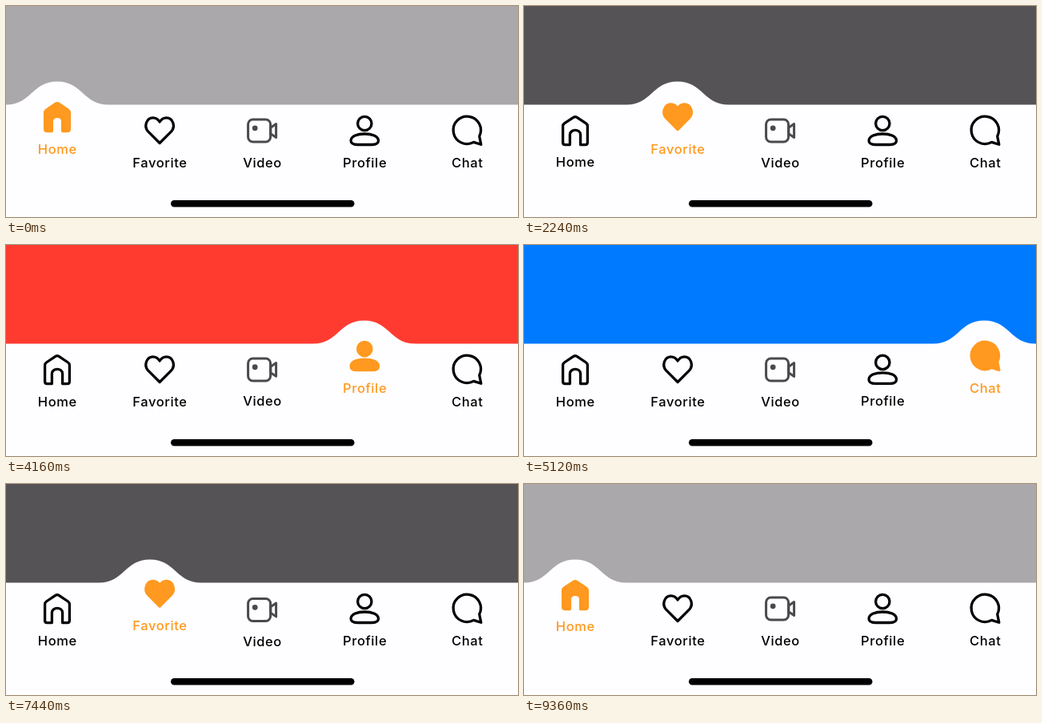
An HTML page for the animation above (9.92 s loop, 640 px wide and 264 px high).

```html
<!DOCTYPE html>
<html lang="en">
<head>
<meta charset="utf-8">
<title>Tab bar</title>
<style>
  html, body { margin: 0; width: 100%; height: 100%; overflow: hidden; background: #fefdff; }
  svg { display: block; width: 100%; height: 100%; }
  text {
    font: 500 16.5px Inter, "Liberation Sans", sans-serif;
    letter-spacing: .6px; text-anchor: middle; fill: #000;
  }
  .icon { fill: none; stroke: #000; stroke-width: 3.3; stroke-linejoin: round; stroke-linecap: round; }
  .video { stroke: #4a494b; stroke-width: 3; }
  .dot { fill: #4a494b; stroke: none; }
  .on text, .on .dot { fill: #ff991f; }
  .on .icon { fill: #ff991f; stroke: #ff991f; }
  .on .video { stroke-width: .4; }
</style>
</head>
<body>
<svg viewBox="0 0 640 264">
  <rect id="page" width="640" height="130"/>
  <path id="bar" fill="#fefdff"/>
  <g id="tabs"></g>
  <rect x="206" y="243" width="229.5" height="8.6" rx="4.3"/>
</svg>
<script>
// Icons are drawn around x = 0, at their resting height.
const TABS = [
  { label: 'Home', page: '#aaa8aa', icon: `<path class="icon" d="M-6.6 173.6H-12.5Q-15.4 173.6 -15.4 170.7V150.5
      Q-15.4 148.2 -13.6 147L-2.2 139.3Q0 137.9 2.2 139.3L13.6 147Q15.4 148.2 15.4 150.5V170.7
      Q15.4 173.6 12.5 173.6H6.6V161C6.6 153.6 -6.6 153.6 -6.6 161Z"/>` },
  { label: 'Favorite', page: '#555355', icon: `<path class="icon" d="M0 171.5L-14.6 156.8C-20.2 150.6 -16.4 139.8 -8.4 139.8
      C-4.6 139.8 -1.8 142 0 145C1.8 142 4.6 139.8 8.4 139.8C16.4 139.8 20.2 150.6 14.6 156.8Z"/>` },
  { label: 'Video', page: '#00fc00', icon: `<g class="icon video"><rect x="-17.6" y="142" width="28" height="28" rx="6"/>
      <path d="M10.6 152.2L17.4 147.6V164.4L10.6 159.8Z"/></g><circle class="dot" cx="-9" cy="152.8" r="3.4"/>` },
  { label: 'Profile', page: '#ff3b30', icon: `<g class="icon"><circle cy="147" r="8.7"/>
      <path d="M-17.2 168.6C-17.2 162.4 -8.5 160 0 160S17.2 162.4 17.2 168.6C17.2 172.2 13 173.5 9 173.5H-9
      C-13 173.5 -17.2 172.2 -17.2 168.6Z"/></g>` },
  { label: 'Chat', page: '#007aff', icon: `<path class="icon" d="M15.3 163L17.4 173.3L8.2 170.4A17.2 17.2 0 1 1 15.3 163Z"/>` }
];
const TAPS = [
  [0, 0], [1340, 1], [2370, 2], [3330, 3], [4370, 4], [5150, 3], [6320, 2], [7060, 1], [8210, 0]
];
const LOOP = 9920, STEP = 80, LIFT = 17, HUMP_DELAY = 40;
const DAMPING = .6, OMEGA = 11.5;

const page = document.getElementById('page');
const bar = document.getElementById('bar');
const tabs = document.getElementById('tabs');
const centre = i => 64 + 128.1 * i;

tabs.innerHTML = TABS.map(({ label, icon }) =>
  `<g>${icon}<text x=".3" y="201.5">${label}</text></g>`).join('');

// Step response of an underdamped spring.
function spring(ms) {
  const t = Math.max(0, ms) / 1000;
  const decay = DAMPING * OMEGA;
  const freq = OMEGA * Math.sqrt(1 - DAMPING * DAMPING);
  return 1 - Math.exp(-decay * t) * (Math.cos(freq * t) + decay / freq * Math.sin(freq * t));
}

function drawBar(x) {
  const base = 123.5, top = 94.5;
  bar.setAttribute('d', `M-20 ${base}H${x - 64}C${x - 32} ${base} ${x - 32} ${top} ${x} ${top}
    S${x + 32} ${base} ${x + 64} ${base}H660V264H-20Z`);
}

function draw(time) {
  const index = TAPS.findLastIndex(([start]) => start <= time);
  const [start, to] = TAPS[index];
  const from = index ? TAPS[index - 1][1] : to;
  const moved = spring(time - start);

  page.setAttribute('fill', TABS[to].page);
  drawBar(centre(from) + (centre(to) - centre(from)) * spring(time - start - HUMP_DELAY));
  [...tabs.children].forEach((tab, i) => {
    const lift = from === to ? +(i === to) : i === to ? moved : i === from ? 1 - moved : 0;
    tab.setAttribute('transform', `translate(${centre(i)} ${-LIFT * lift})`);
    tab.setAttribute('class', i === to ? 'on' : '');
  });
}

const begin = performance.now();
function tick() {
  const time = (performance.now() - begin) % LOOP;
  draw(Math.floor(time / STEP) * STEP);
  requestAnimationFrame(tick);
}
tick();
</script>
</body>
</html>
```
